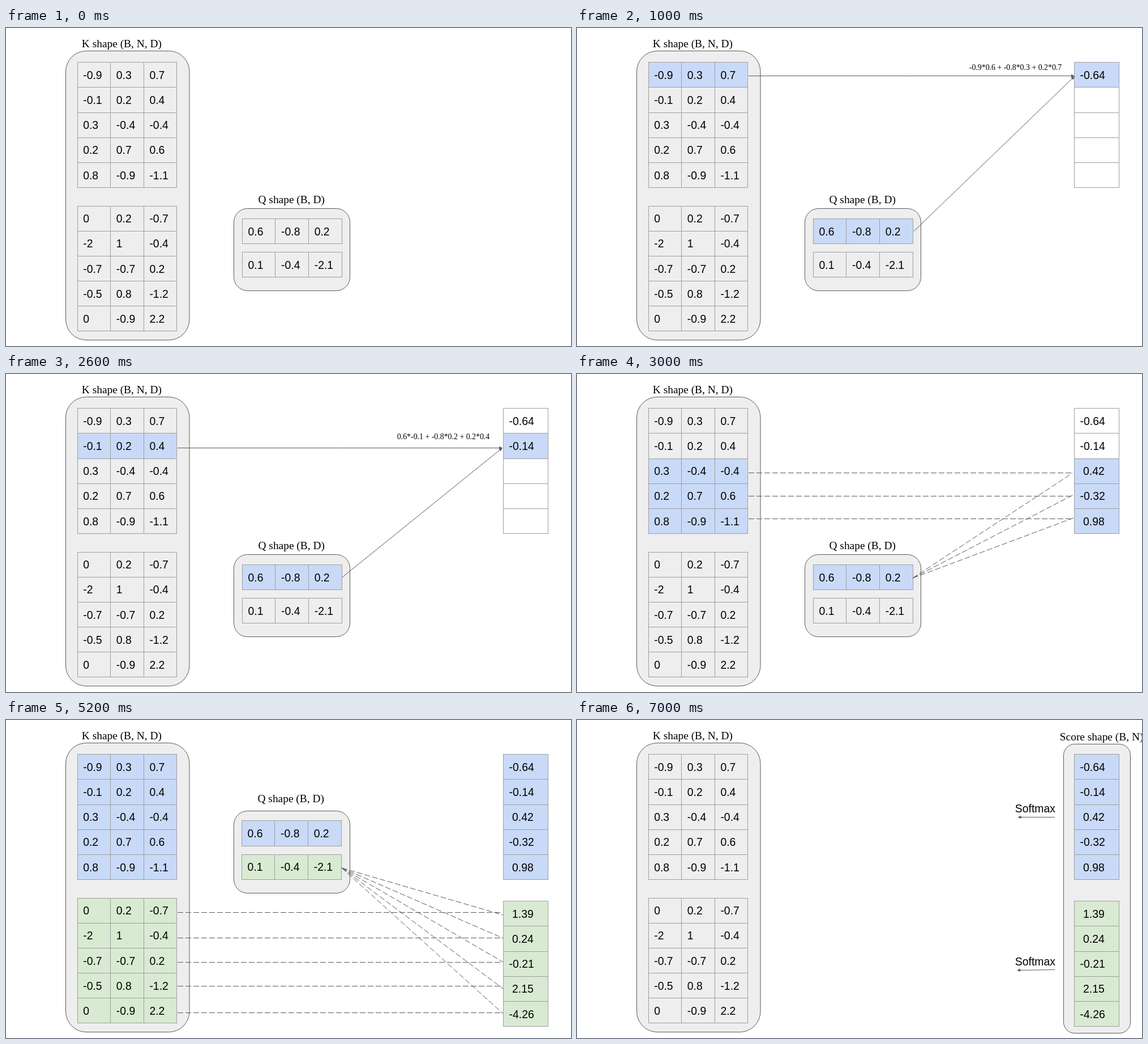
Write an HTML page with a canvas that moves like this. It is 998 px wide and 561 px high and loops after 8 s.

```html
<!DOCTYPE html>
<html lang="en">
<head>
<meta charset="utf-8">
<title>Attention scores</title>
<style>
  html, body { margin: 0; width: 100%; height: 100%; overflow: hidden; background: #fff; }
  canvas { display: block; }
</style>
</head>
<body>
<canvas id="stage" width="998" height="561"></canvas>
<script>
const ctx = document.getElementById('stage').getContext('2d');

const BLUE = '#c9daf8', GREEN = '#d9ead3', GRAY = '#eeeeee', WHITE = '#ffffff';
const INK = '#595959', GRID = '#9e9e9e';
const SANS = '"Liberation Sans", Arial, sans-serif';
const SERIF = '"Liberation Serif", "Times New Roman", serif';
const ROW = 44.15, COL = 58.6, SIZE = 19.4;

const K = [
  [[-0.9, 0.3, 0.7], [-0.1, 0.2, 0.4], [0.3, -0.4, -0.4], [0.2, 0.7, 0.6], [0.8, -0.9, -1.1]],
  [[0, 0.2, -0.7], [-2, 1, -0.4], [-0.7, -0.7, 0.2], [-0.5, 0.8, -1.2], [0, -0.9, 2.2]]
];
const Q = [[0.6, -0.8, 0.2], [0.1, -0.4, -2.1]];

// Positive scores get a leading space so the digits line up.
const scores = K.map((rows, b) => rows.map(row => {
  const dot = row.reduce((sum, v, i) => sum + v * Q[b][i], 0);
  return [(dot < 0 ? '' : ' ') + dot.toFixed(2)];
}));

function label(str, x, y, family = SERIF, size = SIZE) {
  ctx.font = size + 'px ' + family;
  ctx.fillStyle = '#000';
  ctx.fillText(str, x, y);
}

function panel(x, y, w, h) {
  ctx.beginPath();
  ctx.roundRect(x + 0.5, y + 0.5, w, h, Math.min(w, h) / 6);
  ctx.fillStyle = GRAY;
  ctx.fill();
  ctx.strokeStyle = INK;
  ctx.stroke();
}

function table(rows, x, y, colorOf, width = COL) {
  rows.forEach((row, r) => row.forEach((value, c) => {
    const left = Math.floor(x + c * width), top = Math.floor(y + r * ROW);
    const w = Math.floor(x + (c + 1) * width) - left;
    const h = Math.floor(y + (r + 1) * ROW) - top;
    ctx.fillStyle = colorOf(r);
    ctx.fillRect(left + 0.5, top + 0.5, w, h);
    ctx.strokeStyle = GRID;
    ctx.strokeRect(left + 0.5, top + 0.5, w, h);
    label(String(value), x + c * width + 10.2, Math.round(y + r * ROW + 29.2), SANS);
  }));
}

function line(x1, y1, x2, y2, dash = []) {
  ctx.strokeStyle = INK;
  ctx.setLineDash(dash);
  ctx.beginPath();
  ctx.moveTo(x1, y1);
  ctx.lineTo(x2, y2);
  ctx.stroke();
  ctx.setLineDash([]);
}

function dashed(...ends) {
  line(...ends, [10, 4]);
}

function arrow(x1, y1, x2, y2) {
  line(x1, y1, x2, y2);
  ctx.save();
  ctx.translate(x2, y2);
  ctx.rotate(Math.atan2(y2 - y1, x2 - x1));
  ctx.beginPath();
  ctx.moveTo(1, 0);
  ctx.lineTo(-5, -2.8);
  ctx.lineTo(-5, 2.8);
  ctx.fillStyle = INK;
  ctx.fill();
  ctx.restore();
}

function drawKeys(step) {
  const lit = [
    r => step === 4 || step === 1 && r === 0 || step === 2 && r === 1 || step === 3 && r > 1,
    () => step === 4
  ];
  label('K shape (B, N, D)', 133.8, 34);
  panel(105, 40, 218.5, 510);
  table(K[0], 126, 60.8, r => lit[0](r) ? BLUE : GRAY);
  table(K[1], 126, 314, () => lit[1]() ? GREEN : GRAY);
}

function drawQuery(step) {
  const moved = step === 4;
  const x = moved ? 416.3 : 417.3, dy = moved ? -158.5 : 0;
  label('Q shape (B, D)', x + 28.2, moved ? 144.5 : 309);
  panel(402, moved ? 160 : 318, 205, 145);
  table([Q[0]], x, 336.4 + dy, () => step ? BLUE : GRAY);
  table([Q[1]], x, 395.5 + dy, () => moved ? GREEN : GRAY);
}

function drawScores(step) {
  if (step > 4) {
    label('Score shape (B, N)', 852.8, 36);
    panel(859, 42, 118, 510);
  }
  const shown = step < 3 ? step : 5;
  const rows = scores[0].map((row, r) => r < shown ? row : ['']);
  const lit = r => step > 3 || (step === 3 ? r > 1 : r === step - 1);
  table(rows, 878.4, 60.8, r => lit(r) ? BLUE : WHITE, 79.2);
  if (step > 3) table(scores[1], 878.4, 319.7, () => GREEN, 79.2);
}

function drawLinks(step) {
  if (step === 1) {
    arrow(303, 84.5, 878, 84.5);
    arrow(595, 358.5, 878, 86);
    label('-0.9*0.6 + -0.8*0.3 + 0.2*0.7', 692.8, 74, SERIF, 13.86);
  } else if (step === 2) {
    arrow(303, 130.5, 876, 130.5);
    arrow(594, 358.5, 876, 131);
    label('0.6*-0.1 + -0.8*0.2 + 0.2*0.4', 690.8, 115, SERIF, 13.86);
  } else if (step === 3) {
    [[174.5, 175, 875], [215.5, 213, 877], [255.5, 254, 877]].forEach(([y, end, x]) => {
      dashed(303, y, x, y);
      dashed(593, 360, x, end);
    });
  } else if (step === 4) {
    [[339.5, 344], [384.5, 385], [427.5, 427], [469.5, 474], [516.5, 518]].forEach(([y, end]) => {
      dashed(303, y, 877, y);
      dashed(593, 261, 878, end);
    });
  } else if (step === 6) {
    label('Softmax', 773.8, 163, SANS);
    arrow(844, 171.5, 779.5, 171.5);
    label('Softmax', 773.8, 432.5, SANS);
    arrow(844, 440.5, 778, 441.5);
  }
}

function draw(now) {
  const second = Math.floor(now / 1000) % 8;
  const step = second > 4 ? second - 1 : second;
  ctx.fillStyle = WHITE;
  ctx.fillRect(0, 0, 998, 561);
  ctx.lineWidth = 1;
  drawKeys(step);
  if (step < 5) drawQuery(step);
  if (step > 0) drawScores(step);
  drawLinks(step);
}

let start;
function tick(now) {
  start ??= now;
  draw(now - start);
  requestAnimationFrame(tick);
}
requestAnimationFrame(tick);
</script>
</body>
</html>
```
